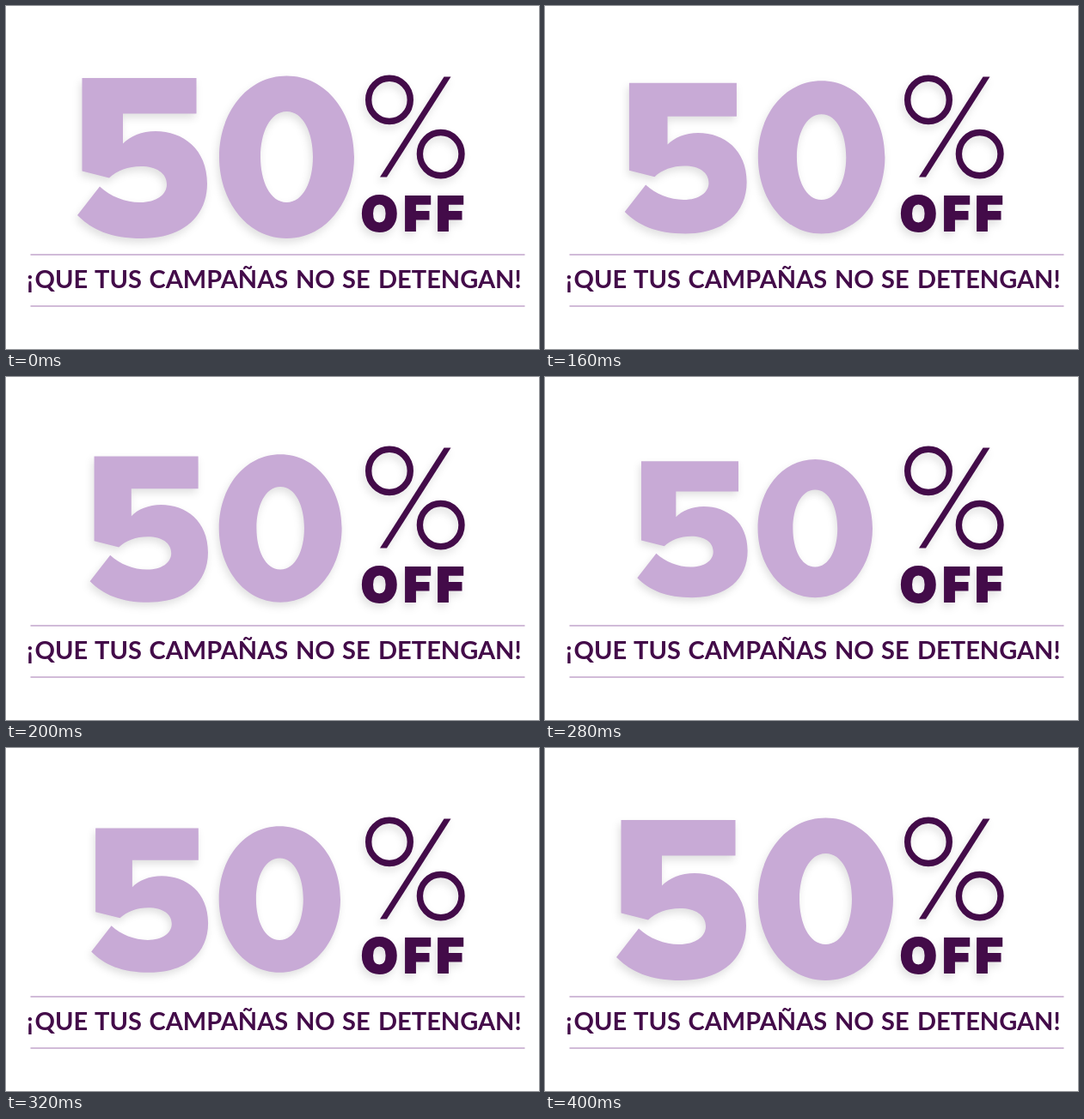
Animation, 620 px wide and 400 px high, one loop 440 ms. Source, as an HTML page:

```html
<!DOCTYPE html>
<html lang="es">
<head>
<meta charset="utf-8">
<title>50% OFF</title>
<style>
  html, body { margin: 0; width: 100%; height: 100%; overflow: hidden; background: #fff; }
  svg { display: block; width: 620px; height: 400px; }
  text { fill: #430b49; }
  .shadow { filter: drop-shadow(-2px 5px 5px rgba(0, 0, 0, .12)); }
  .number { fill: #c8aad6; fill-rule: evenodd; }
  .ring { fill: none; stroke: #430b49; stroke-width: 7.4; }
  .off { font: 900 55px Inter, sans-serif; stroke: #430b49; stroke-width: 2; }
  .slogan { font: 700 29px Lato, sans-serif; }
  .rule { stroke: #c2a5cb; stroke-width: 1.5; }
</style>
</head>
<body>
<svg viewBox="0 0 620 400">
  <g id="fifty">
    <g class="number shadow" role="img" aria-label="50">
      <path d="M88.5 84H221.5V125.5H136V160.5C144 152 158 146 174 146
        C206 146 234 167 234 207C234 246 205 271 158 271
        C122 271 100 261 83 244L109 210.5C121 222 139 229 156 229
        C175 229 187 220 187 208C187 195 175 187 157 187
        C142 187 129 192 120 200.5L88.5 192.5Z"/>
      <path d="M326.5 81.5C373 81.5 405 125 405 176S373 271 326.5 271S248 227 248 176S280 81.5 326.5 81.5Z
        M326.5 123C307 123 296 148 296 176S307 229 326.5 229S357 204 357 176S346 123 326.5 123Z"/>
    </g>
  </g>

  <g class="shadow">
    <g role="img" aria-label="%">
      <ellipse class="ring" cx="446" cy="109.4" rx="24.3" ry="25.1"/>
      <ellipse class="ring" cx="505.7" cy="172.6" rx="24.3" ry="25.1"/>
      <path fill="#430b49" d="M509.5 82.5H517.5L443 199.5H435Z"/>
    </g>
    <text class="off" x="413 462.5 500.5" y="262">OFF</text>
  </g>

  <path class="rule" d="M28.5 290H603.5M28.5 350H603.5"/>
  <text class="slogan" y="329"><tspan x="24">¡</tspan><tspan x="33.5">QUE </tspan><tspan x="103">TUS </tspan><tspan x="166.5">CAMPAÑAS </tspan><tspan x="337">NO </tspan><tspan x="391">SE </tspan><tspan x="433">DETENGAN!</tspan></text>
</svg>
<script>
  const LOOP = 440, STEP = 40;
  const CENTER = [245, 179];
  const fifty = document.getElementById('fifty');

  // Holds full size, shrinks 3% per step to 85%, then grows back 5% per step.
  function scaleAt(time) {
    const step = Math.floor(time / STEP) - 2;
    if (step <= 0) return 1;
    return step <= 5 ? 1 - 0.03 * step : Math.min(1, 0.85 + 0.05 * (step - 5));
  }

  function draw() {
    const [x, y] = CENTER;
    const scale = scaleAt(performance.now() % LOOP);
    fifty.setAttribute('transform', `translate(${x} ${y}) scale(${scale}) translate(${-x} ${-y})`);
    requestAnimationFrame(draw);
  }
  draw();
</script>
</body>
</html>
```
